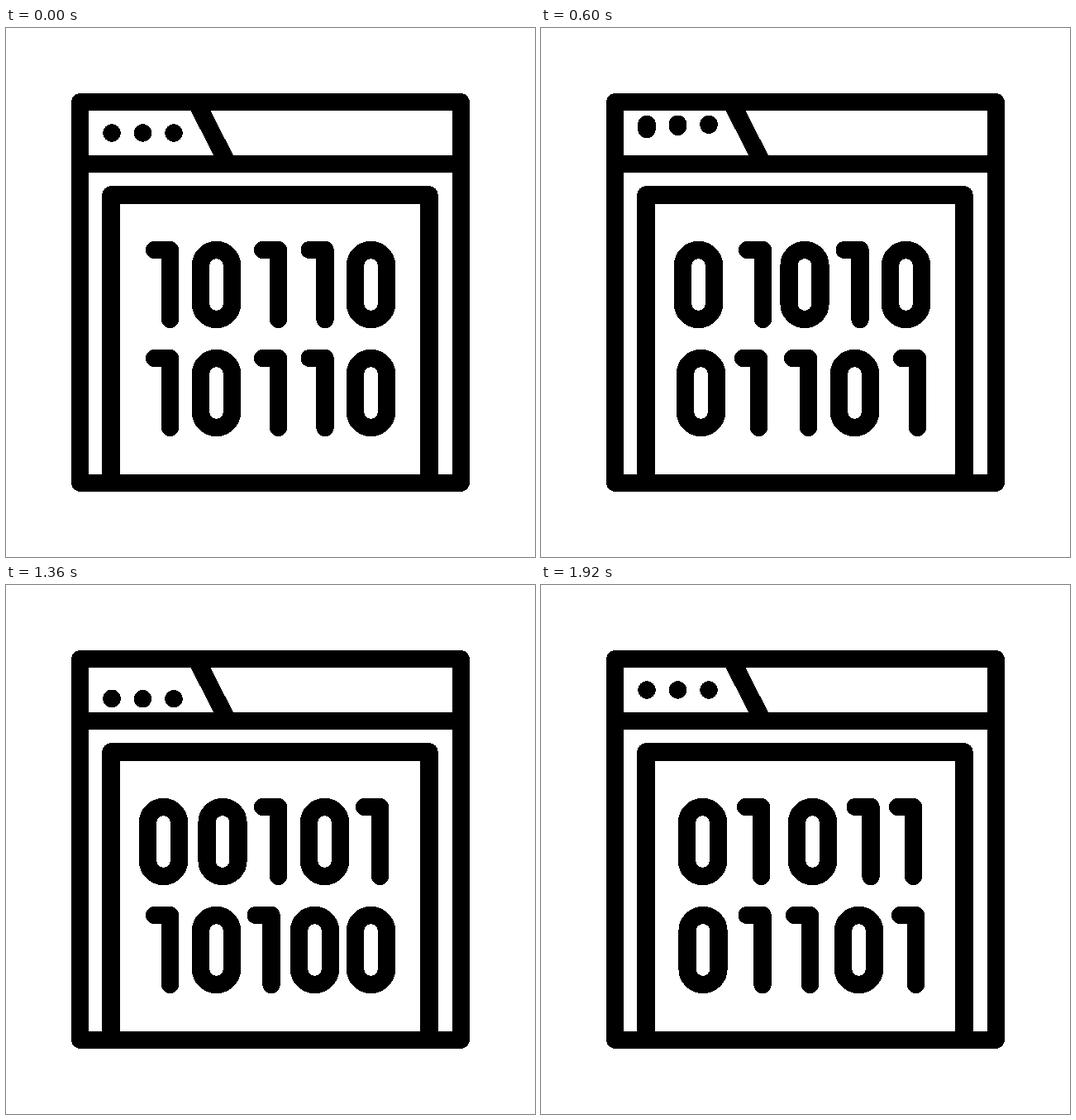
Write an HTML page that moves like this. It is 640 by 640 pixels and loops after 2400 ms.

```html
<!DOCTYPE html>
<html lang="en">
<head>
<meta charset="utf-8">
<title>Binary code window</title>
<style>
  @property --top { syntax: "<length>"; inherits: false; initial-value: 0px; }
  @property --bottom { syntax: "<length>"; inherits: false; initial-value: 0px; }

  html, body { margin: 0; width: 100%; height: 100%; overflow: hidden; background: #fff; }
  svg { display: block; width: 100%; height: 100%; }

  .ink {
    fill: none;
    stroke: #000;
    stroke-width: 21.3px;
    stroke-linecap: round;
    stroke-linejoin: round;
  }

  /* The two ends of each dot travel separately, which stretches it. */
  .dot {
    y: calc(116.3px + var(--top));
    height: calc(21.4px + var(--bottom) - var(--top));
    animation: top 2.4s infinite, bottom 2.4s infinite;
    animation-timing-function: cubic-bezier(.37, 0, .63, 1);
    animation-delay: calc(var(--i) * 60ms);
  }
  @keyframes top {
    0% { --top: 0px; }
    10.83%, 28.75% { --top: -10.7px; }
    45.42%, 54.17% { --top: 10.7px; }
    72.08%, 100% { --top: 0px; }
  }
  @keyframes bottom {
    0%, 3.33% { --bottom: 0px; }
    14.17%, 17.08% { --bottom: -10.7px; }
    38.75% { --bottom: 10.7px; }
    62.5% { --bottom: 10.7px; animation-timing-function: cubic-bezier(.4, 0, .7, .6); }
    75%, 100% { --bottom: 0px; }
  }

  .code {
    visibility: hidden;
    animation: show 2.4s step-end infinite;
    animation-delay: calc(var(--i) * 600ms - 2410ms);
  }
  @keyframes show {
    0% { visibility: visible; }
    25%, 100% { visibility: hidden; }
  }
</style>
</head>
<body>
<svg viewBox="0 0 640 640" shape-rendering="crispEdges">
  <g class="ink">
    <rect x="89.7" y="89.7" width="460.6" height="460.6"/>
    <path d="M89.7 164.5H550.3M230.4 90L268.1 164M127 550V202H512V550"/>
  </g>
  <rect class="dot" style="--i:0" x="117.3" width="21.4" rx="10.7"/>
  <rect class="dot" style="--i:1" x="154.8" width="21.4" rx="10.7"/>
  <rect class="dot" style="--i:2" x="192.3" width="21.4" rx="10.7"/>
  <g id="codes" class="ink"></g>
</svg>
<script>
  // Each row: its digits, then the x of every stem (1) or centre (0).
  const screens = [
    [["10110", 198.5, 254.5, 329.5, 386, 441.5], ["10110", 198.5, 254.5, 329.5, 386, 441.5]],
    [["01010", 190.5, 268.5, 319, 386, 441.5], ["01101", 193.5, 263.5, 323.5, 379.5, 455.5]],
    [["00101", 190.5, 262, 329.5, 385.5, 452.5], ["10100", 198.5, 254.5, 321, 373.5, 441.5]],
    [["01011", 195.5, 266.5, 328.5, 399, 450.5], ["01101", 196, 268, 325.5, 384.5, 453.5]]
  ];

  const digit = (d, x, y) => d === "1"
    ? `M${x - 18.8} ${y}h18.8v84`
    : `M${x - 19} ${y + 19}a19 19 0 0 1 38 0v46a19 19 0 0 1 -38 0z`;

  const row = ([digits, ...xs], r) =>
    xs.map((x, k) => digit(digits[k], x, 268.5 + r * 131)).join("");

  document.getElementById("codes").innerHTML = screens
    .map((rows, i) => `<path class="code" style="--i:${i}" d="${rows.map(row).join("")}"/>`)
    .join("");
</script>
</body>
</html>
```
